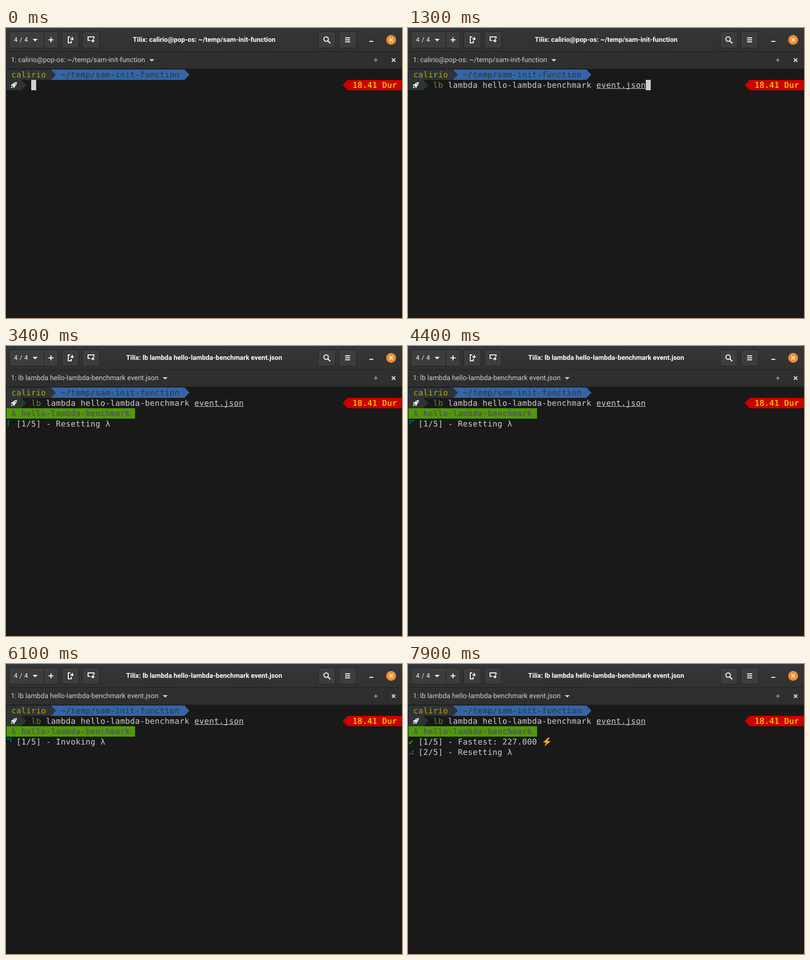
Recreate the animation shown at these times as an HTML page. Size 801 px wide and 587 px high, loop 8000 ms.

```html
<!DOCTYPE html>
<html lang="en">
<head>
<meta charset="utf-8">
<title>Terminal</title>
<style>
  html, body { margin: 0; width: 100%; height: 100%; overflow: hidden; background: #191919; }
  svg { display: block; }
  text { white-space: pre; text-rendering: geometricPrecision; }
  .ui { font: 13.9px Roboto, "Open Sans", sans-serif; fill: #d0d0d0; }
  .title { font-weight: 700; font-size: 13.5px; fill: #fff; text-anchor: middle; }
  .count { font-size: 13px; word-spacing: 1px; fill: #f4f4f4; }
  /* 16px glyphs on a 10px cell grid */
  .term { font: 16px "DejaVu Sans Mono", "Liberation Mono", monospace; letter-spacing: .367px; fill: #d0cfcc; }
  .btn { fill: #3d3d3d; stroke: #222; }
  .icon { fill: none; stroke: #f4f4f4; stroke-width: 2; }
  .green { fill: #4e9a06; }
  .hint { fill: #555753; }
</style>
</head>
<body>
<svg width="801" height="587" viewBox="0 0 801 587">
  <defs>
    <linearGradient id="bar" x2="0" y2="1">
      <stop stop-color="#363636"/><stop offset="1" stop-color="#313131"/>
    </linearGradient>
  </defs>
  <rect width="801" height="587" fill="#191919"/>

  <!-- header bar -->
  <rect width="801" height="47" fill="url(#bar)"/>
  <rect width="801" height="1" fill="#2c3d58"/>
  <rect y="47" width="801" height="1" fill="#1e1e1e"/>
  <rect class="btn" x="6.5" y="7.5" width="99" height="33" rx="4"/>
  <path d="M76.5 8V40" stroke="#222"/>
  <rect class="btn" x="112.5" y="7.5" width="35" height="33" rx="4"/>
  <rect class="btn" x="154.5" y="7.5" width="35" height="33" rx="4"/>
  <rect class="btn" x="631.5" y="7.5" width="35" height="33" rx="4"/>
  <rect class="btn" x="673.5" y="7.5" width="35" height="33" rx="4"/>
  <text class="ui count" x="16" y="28">4 / 4</text>
  <path d="M54 22H64L59 27Z" fill="#f4f4f4"/>
  <g class="icon">
    <path d="M86 24H96M91 19V29"/>
    <path d="M130 18H126V30H132V26M130 22H137M134 18V25"/>
    <path d="M170 25H166V18H178V22M172 26H179M176 22V29"/>
    <circle cx="647.5" cy="22.5" r="4.5"/>
    <path d="M651 26L656 31" stroke-width="2.4"/>
    <path d="M686 20H696M686 24H696M686 28H696"/>
    <path d="M735 27H743"/>
  </g>
  <circle cx="779" cy="24" r="10" fill="#f68b28"/>
  <path class="icon" d="M775.5 20.5L782.5 27.5M782.5 20.5L775.5 27.5"/>
  <text class="ui title" id="title" x="400.8" y="28"></text>

  <!-- tab bar -->
  <rect y="48" width="801" height="34" fill="#2f2f2f"/>
  <rect y="82" width="801" height="1" fill="#222"/>
  <text class="ui" id="tab" x="10" y="69"></text>
  <path id="arrow" d="M0 63H10L5 68Z" fill="#d0d0d0"/>
  <path d="M744 65H752M748 61V69" stroke="#8c8c8c" stroke-width="2"/>
  <path d="M780.5 61.5L787.5 68.5M787.5 61.5L780.5 68.5" stroke="#dedede" stroke-width="2"/>

  <!-- prompt -->
  <path d="M91 84H361L371 94.5L361 105H91Z" fill="#3465a4"/>
  <path d="M1 84H91L101 94.5L91 105H31L41 115.5L31 126H1Z" fill="#2e3436"/>
  <path d="M801 105H691L681 115.5L691 126H801Z" fill="#c00"/>
  <path d="M22 109.5C18 109.5 15.5 111 13.5 113.5L11 114L9.8 117L12.4 116.6L15 119.2L14.7 121.8L17.6 120.4L18 118C20.6 116 22.2 113.5 22 109.5ZM12 118C10.6 118.4 10.2 120 10 121.6C11.6 121.4 13.2 121 13.6 119.6Z" fill="#e4e6e2"/>
  <circle cx="18.6" cy="113" r="1" fill="#2e3436"/>
  <g class="term">
    <text x="11" y="100" fill="#c4a000">calirio</text>
    <text x="111" y="100" fill="#2e3436">~/temp/sam-init-function</text>
    <text x="701" y="121" fill="#ff0">18.41 Dur</text>
    <text class="green" id="cmd" x="51" y="121"></text>
    <text id="args" x="71" y="121"></text>
    <text id="file" x="381" y="121">event.json</text>
    <path id="line" d="M381 122.5H481" stroke="#d0cfcc"/>
    <rect id="cursor" width="10" height="21"/>

    <!-- benchmark output -->
    <g id="output">
      <rect class="green" x="1" y="126" width="260" height="21"/>
      <text class="hint" x="11" y="142" font-weight="700">λ hello-lambda-benchmark</text>
      <text id="first" x="21" y="163"></text>
      <g id="done">
        <text class="green" x="1" y="163">✔</text>
        <path d="M283.5 149L273 159H279.5L276 167L288.5 156H281.5L287 149Z" fill="#fbb21b"/>
        <text x="21" y="184">[2/5] - Resetting λ</text>
      </g>
      <g id="dots" fill="#06989a"></g>
    </g>
  </g>
</svg>
<script>
const $ = id => document.getElementById(id);
const show = (id, on) => $(id).style.display = on ? "" : "none";
const put = (id, text) => { if ($(id).textContent !== text) $(id).textContent = text; };

const LOOP = 8000, TICK = 100, SPIN = 80;
const ENTER = 2700, START = 2760, INVOKE = 6000, SECOND = 6660;
const SPINNER = "⠋⠙⠹⠸⠼⠴⠦⠧⠇⠏";
const PLACE = "calirio@pop-os: ~/temp/sam-init-function";
const ARGS = " lambda hello-lambda-benchmark ";
const COMMAND = "lb" + ARGS + "event.json";

// Braille bits 0-2 are the left column, 3-5 the right one.
for (let i = 0; i < 6; i++) {
  const dot = document.createElementNS("http://www.w3.org/2000/svg", "circle");
  dot.setAttribute("cx", i < 3 ? 4.5 : 9.5);
  dot.setAttribute("cy", 151.5 + i % 3 * 4.5);
  dot.setAttribute("r", 1.4);
  $("dots").append(dot);
}

function drawHeader(running) {
  put("title", "Tilix: " + (running ? COMMAND : PLACE));
  put("tab", "1: " + (running ? COMMAND : PLACE));
  $("arrow").setAttribute("transform", `translate(${running ? 317 : 290})`);
}

function drawCommand(t) {
  const typed = t < 800 ? 0 : t < 900 ? 1 : 2;
  const accepted = t >= 1300;
  put("cmd", "lb".slice(0, typed));
  put("args", typed ? ARGS : "");
  $("args").setAttribute("class", accepted ? "" : "hint");
  $("file").setAttribute("class", accepted ? "" : "hint");
  show("file", typed);
  show("line", accepted);

  const running = t >= ENTER;
  const off = (t >= 100 && t < 700) || (t >= 1800 && t < 2400) || t >= START;
  $("cursor").setAttribute("x", running ? 1 : accepted ? 481 : 51 + typed * 10);
  $("cursor").setAttribute("y", running ? 126 : 105);
  show("cursor", !off);
}

function drawOutput(t) {
  const second = t >= SECOND;
  show("output", t >= START);
  show("done", second);
  put("first", "[1/5] - " + (second ? "Fastest: 227.000" : t >= INVOKE ? "Invoking λ" : "Resetting λ"));

  const step = Math.max(0, Math.floor((t - (second ? SECOND : START)) / SPIN));
  const bits = SPINNER.charCodeAt(step % SPINNER.length);
  [...$("dots").children].forEach((dot, i) => dot.style.display = bits >> i & 1 ? "" : "none");
  $("dots").setAttribute("transform", `translate(0 ${second ? 21 : 0})`);
}

let begin;
function frame(now) {
  begin ??= now;
  const t = Math.floor((now - begin) % LOOP / TICK) * TICK;
  drawHeader(t >= ENTER);
  drawCommand(t);
  drawOutput(t);
  requestAnimationFrame(frame);
}
requestAnimationFrame(frame);
</script>
</body>
</html>
```
